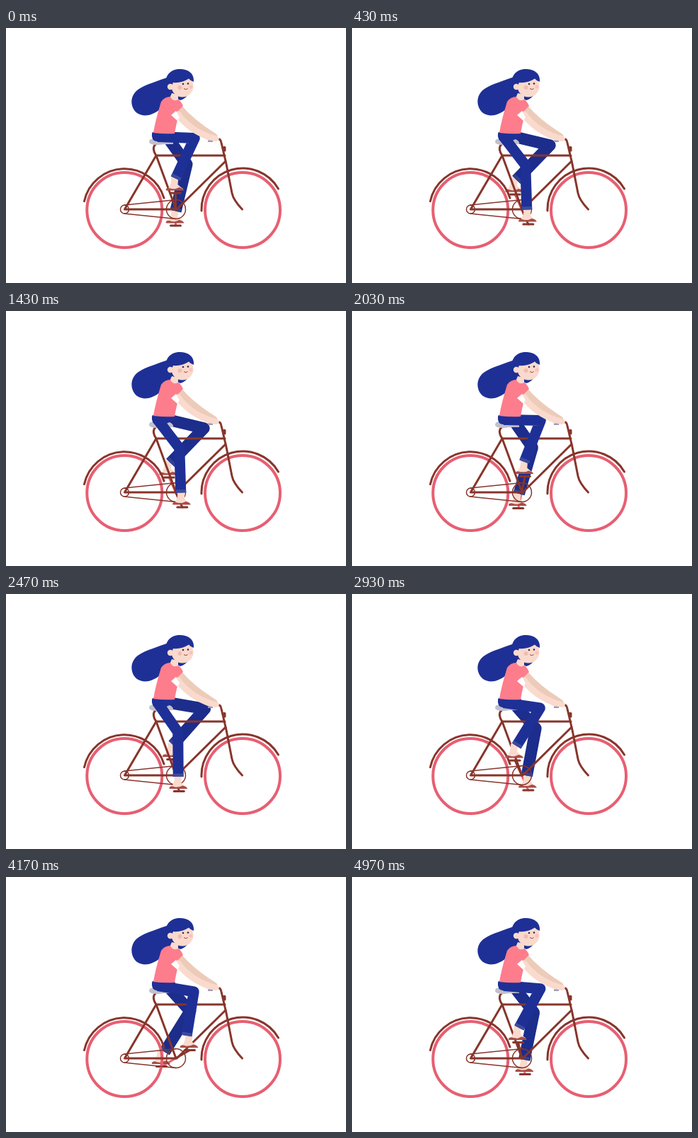
Write an HTML page that moves like this. It is 480 px wide and 360 px high and loops after 5000 ms.

```html
<!DOCTYPE html>
<html lang="en">
<head>
<meta charset="utf-8">
<title>Cyclist</title>
<style>
  html, body { margin: 0; width: 100%; height: 100%; overflow: hidden; background: #fff; }
  svg { display: block; width: 480px; height: 360px; }
  .line { fill: none; stroke: #87352b; stroke-width: 3; stroke-linecap: round; stroke-linejoin: round; }
  .thin { stroke-width: 1.5; }
  .tyre { fill: none; stroke: #e75f72; stroke-width: 4; }
  .hair, .jeans { fill: #1e3096; }
  .leg { fill: none; stroke: #1e3096; stroke-width: 15; stroke-linejoin: round; }
  .cuff { stroke: #3c4b9c; stroke-width: 14; }
  #far .leg { stroke: #1c2d8b; stroke-width: 16.5; }
  #far .cuff { stroke: #33428f; stroke-width: 14; }
  .skin { fill: #f9dacd; }
  .arm { fill: none; stroke: #f9dacd; stroke-width: 9; stroke-linecap: round; }
  .shade { stroke: #edcbb9; }
  .shirt { fill: #fd7d8c; }
  .shoe { fill: #a94c46; }
</style>
</head>
<body>
<svg viewBox="0 0 480 360">
  <defs>
    <g id="foot">
      <path class="skin" d="M-6-23H4L3-12Q7-8 11-6H-11Q-6-12-6-23Z"/>
      <path class="shoe" d="M-14-4.500Q-13-8-9-7Q-3-5 0-6L5-8Q11-7 12-3.500H-13Z"/>
      <path class="line" d="M-7 0H7"/>
    </g>
  </defs>

  <path class="hair" id="hair"/>

  <g id="far">
    <path class="line" style="stroke:#e2626f"/>
    <use href="#foot"/>
    <path class="leg"/>
    <path class="cuff"/>
  </g>

  <circle class="tyre" cx="167.3" cy="257" r="53"/>
  <circle class="tyre" cx="334" cy="257" r="53"/>
  <g class="line">
    <path d="M110.500 244.500A58.200 58.200 0 0 1 223 240M276 258A58.200 58.200 0 0 1 384.500 227"/>
    <path d="M212 180L167.500 256H240L212 180H309M310 188L241 256"/>
    <path d="M212 180C208 174 206 167 213 163"/>
    <path d="M297 157Q303 155 304 162L311 192L319 233Q321 243 333.500 256"/>
    <path d="M307.500 168.500H309V173H307.500Z"/>
    <g class="thin">
      <circle cx="167.500" cy="256" r="6"/>
      <circle cx="240" cy="256" r="13.500"/>
      <path d="M167 250L240 242.500M167 262L240 269.500"/>
    </g>
  </g>
  <path fill="#c1c0cb" d="M204 157H231Q237 160 236 164Q222 163.500 215 165Q203 165.500 202 161Q202 158 204 157Z"/>

  <g id="near">
    <path class="line"/>
    <use href="#foot"/>
    <path class="leg"/>
    <path class="cuff"/>
  </g>
  <path class="jeans" d="M207 147H238L240 153L224 160H212Q205 159 206 149Z"/>

  <path class="arm shade" d="M245 113Q264 135 294 153"/>
  <path class="skin" d="M234 92L243 94L243 104Q236 107 231 99Z"/>
  <path class="shirt" d="M219 104Q224 97 232 97Q236 105 243 101Q247 103 250 110L241 119L243 126Q240 137 238 149Q224 150 208 148Q211 130 219 104Z"/>
  <path class="arm" d="M243 122Q258 144 291 155.500"/>
  <path fill="#fff" d="M233 123L240 117L245 126L242 131Z"/>
  <path fill="#9d9cb5" d="M285 158.500H292V161H285Z"/>
  <path class="skin" d="M285 151Q295 150 301 155Q301 160 295 160L284 157Z"/>

  <circle class="skin" cx="249" cy="82" r="15.500"/>
  <path class="hair" d="M226 82C223 68 232 58 245 58C256 58 266 63 265 76Q261 75 258 71.500Q248 78 236 77L233 84Z"/>
  <circle class="skin" cx="232" cy="83" r="4.200"/>
  <circle cx="245.500" cy="84" r="3" fill="#efbdb2"/>
  <circle cx="261" cy="83" r="2.600" fill="#ffbfbd"/>
  <circle cx="250" cy="79" r="1.300" fill="#352a45"/>
  <circle cx="257" cy="78.500" r="1.300" fill="#352a45"/>
  <path d="M251 85.500Q254 88 256.500 85.500" fill="none" stroke="#96463f"/>
</svg>
<script>
const CRANK = { x: 239.5, y: 256, r: 23 };
const hair = document.getElementById('hair');

// seat: where the trouser leg is drawn from; hip: the joint it swings about
function makeLeg({ id, seat, hip, thigh, shin, phase }) {
  const [crank, foot, leg, cuff] = document.getElementById(id).children;
  return turn => {
    const sin = Math.sin(turn + phase), cos = Math.cos(turn + phase);
    const px = CRANK.x + CRANK.r * sin, py = CRANK.y - CRANK.r * cos;
    // The ankle rolls, so the hem swings less than the pedal
    const ax = CRANK.x + 18 * sin, ay = py - 20.5;
    const dx = ax - hip[0], dy = ay - hip[1], d = Math.hypot(dx, dy);
    const bend = Math.acos((thigh ** 2 + d * d - shin ** 2) / (2 * thigh * d));
    const lift = Math.atan2(dy, dx) - bend;
    const kx = hip[0] + thigh * Math.cos(lift);
    const ky = hip[1] + thigh * Math.sin(lift);
    const hx = ax + (kx - ax) * 0.07, hy = ay + (ky - ay) * 0.07;
    crank.setAttribute('d', `M${CRANK.x} ${CRANK.y}L${px} ${py}`);
    foot.setAttribute('transform', `translate(${px} ${py})`);
    leg.setAttribute('d', `M${seat}L${kx} ${ky}L${ax} ${ay}`);
    cuff.setAttribute('d', `M${hx} ${hy}L${ax} ${ay}`);
  };
}

const legs = [
  makeLeg({ id: 'far', seat: [227, 153], hip: [224, 140], thigh: 61, shin: 68, phase: Math.PI }),
  makeLeg({ id: 'near', seat: [214, 153.5], hip: [212, 150], thigh: 54.5, shin: 63, phase: 0 })
];

function drawHair(turn) {
  const puff = 1.5 + 1.5 * Math.sin(turn);
  hair.setAttribute('d', `M231 ${70 - puff}C216 ${76 - puff} 197 ${81 - puff} 187 ${88 - puff}
    C174 ${97 - puff} 175 112 185 120C194 126 206 124 217 115C225 108 231 99 236 97
    L246 102Q252 101 258 93L240 80Z`);
}

// One pedal turn per second, stepped at 30 poses a second
function draw(now) {
  const pose = Math.floor((now % 5000 + 3.4) * 0.03);
  const turn = pose / 30 * 2 * Math.PI;
  drawHair(turn);
  legs.forEach(pedal => pedal(turn));
  requestAnimationFrame(draw);
}
draw(performance.now());
</script>
</body>
</html>
```
